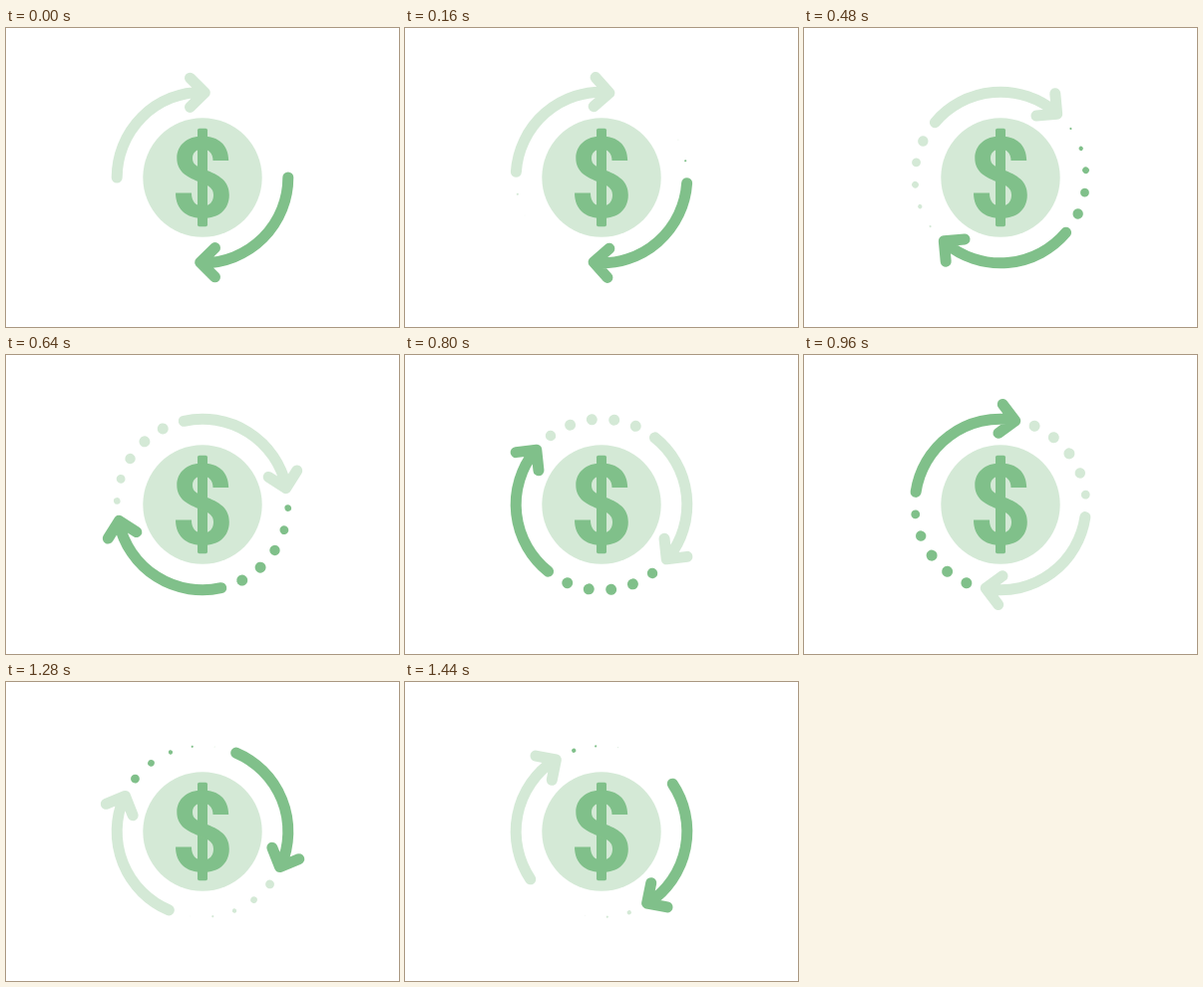
Recreate the animation shown at these times as an HTML page. Size 394 by 300 pixels, loop 1.48 s.

```html
<!DOCTYPE html>
<html lang="en">
<head>
<meta charset="utf-8">
<title>Money cycle</title>
<style>
  html, body { margin: 0; width: 100%; height: 100%; overflow: hidden; background: #fff; }
  svg { display: block; width: 100%; height: 100%; }
  .light { color: #d4e9d6; }
  .dark { color: #80c08a; }
  .fill { fill: currentColor; }
  .line { fill: none; stroke: currentColor; stroke-width: 11; stroke-linecap: round; stroke-linejoin: round; }
</style>
</head>
<body>
<svg viewBox="0 0 394 300">
  <circle class="light fill" cx="197" cy="150" r="59.7"/>
  <g class="dark fill">
    <rect x="192" y="100.8" width="10" height="98.4" rx="1.8"/>
    <path d="M223.2 133H207.5C207.5 126 203.5 121.5 197 121.5C190.5 121.5 187 125.5 187 130.5
      C187 136 190 138.5 199 142C214 147.5 223.8 153.5 223.8 167.5C223.8 182 213.5 191 197.5 191
      C181 191 170 182 170 165.5H186C186 174 190 178.5 197.5 178.5C204.5 178.5 208 174 208 167.5
      C208 161.5 204.5 158.5 196 155.2C181 149.8 171.3 144 171.3 130.5C171.3 117.5 181.5 108.5 197 108.5
      C213 108.5 223.2 117.5 223.2 133Z"/>
  </g>
  <g class="light arrow" data-start="0"></g>
  <g class="dark arrow" data-start="180"></g>
</svg>
<script>
const LOOP = 1480;
const SPIN = 1900;      // a full turn; the loop cuts it short
const RADIUS = 85.8;
const DOTS = 5, DOT_GAP = 15, DOT_R = 5.5;
const STAGGER = 80, SCALE_TIME = 560, SHRINK_AT = 800;

const smooth = x => {
  x = Math.min(1, Math.max(0, x));
  return x * x * (3 - 2 * x);
};

// cubic-bezier(x1, 0, x2, 1)
function ease(x, x1 = 0.495, x2 = 0.488) {
  let lo = 0, hi = 1;
  for (let i = 0; i < 24; i++) {
    const s = (lo + hi) / 2, r = 1 - s;
    if (3 * x1 * s * r * r + 3 * x2 * s * s * r + s * s * s < x) lo = s;
    else hi = s;
  }
  return smooth((lo + hi) / 2);
}

function add(parent, tag, attrs) {
  const el = document.createElementNS("http://www.w3.org/2000/svg", tag);
  for (const name in attrs) el.setAttribute(name, attrs[name]);
  return parent.appendChild(el);
}

const arrows = [...document.querySelectorAll(".arrow")].map(group => {
  const dots = [];
  for (let k = 1; k <= DOTS; k++) {
    const a = -k * DOT_GAP * Math.PI / 180;
    dots.push(add(group, "circle", {
      class: "fill", cx: -RADIUS * Math.cos(a), cy: -RADIUS * Math.sin(a), r: 0
    }));
  }
  add(group, "path", {
    class: "line",
    d: `M${-RADIUS} 0A${RADIUS} ${RADIUS} 0 0 1 0 ${-RADIUS}L2.3 -85.2M-12.5 -99.8L2.3 -85.2L-12.5 -70.6`
  });
  return { group, dots, start: +group.dataset.start };
});

function draw(t) {
  const turn = 360 * ease(t / SPIN);
  for (const { group, dots, start } of arrows) {
    group.setAttribute("transform", `translate(197 150) rotate(${start + turn})`);
    dots.forEach((dot, i) => {
      const u = t - i * STAGGER;
      const size = smooth(u / SCALE_TIME) - smooth((u - SHRINK_AT) / SCALE_TIME);
      dot.setAttribute("r", DOT_R * size);
    });
  }
}

let begin;
function tick(now) {
  begin ??= now;
  draw((now - begin) % LOOP);
  requestAnimationFrame(tick);
}
draw(0);
requestAnimationFrame(tick);
</script>
</body>
</html>
```
